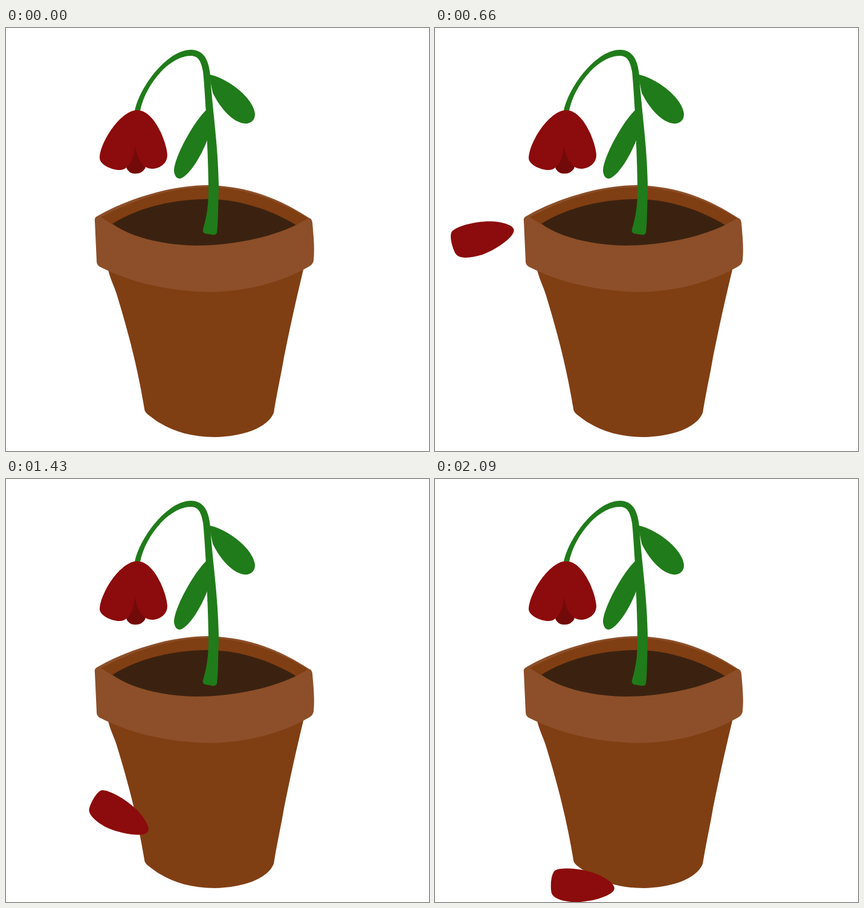
These frames come from a looping animation (700 px wide and 700 px high, 2200 ms). An HTML page:

```html
<!DOCTYPE html>
<html>
<head>
<meta charset="utf-8">
<style>
  html, body { margin: 0; width: 100%; height: 100%; overflow: hidden; background: #fff; }
  svg { display: block; width: 100%; height: 100%; }
</style>
</head>
<body>
<svg viewBox="0 0 700 700">
  <!-- pot -->
  <path fill="#803e13" d="M168 396C172 415 179 427 183 440C206 515 219 570 229 630Q229 636 238 642C265 664 300 677 345 677C390 676 432 663 443 637C449 600 456 570 460 545C470 495 480 450 493 396Z"/>
  <path fill="#8c4f29" d="M150 312C190 288 265 260 335 260C403 262 455 284 501 314Q506 315 507 322C509 345 511 365 509 385Q508 391 501 395C455 421 400 436 335 437C270 435 210 423 155 395Q150 392 150 386L147 320Q146 314 150 312Z"/>
  <path fill="#803e13" d="M157 313C205 287 270 263 335 263C400 265 455 288 500 315L480 326L176 325Z"/>
  <path fill="#3b2210" d="M176 324C215 299 275 283 335 283C390 284 440 302 480 326C435 348 370 360 315 360C260 359 208 347 176 324Z"/>
  <!-- plant -->
  <g fill="#207b1a">
    <path d="M213 137C222 95 268 36 306 36C330 36 336 58 338 78C341 130 352 200 352 265C351 300 351 325 349 339Q347 343 341 342L329 340Q325 338 326 333C333 310 335 290 335 270C335 220 332 180 331 140C329 110 328 90 326 72C323 55 318 46 306 46C270 46 230 95 222 137Z"/>
    <path d="M336 77C365 82 410 115 412 143C412 154 403 159 394 158C372 155 352 128 342 107Z"/>
    <path d="M333 134C310 155 278 215 278 236C279 246 283 250 289 249C305 243 325 208 334 183Z"/>
  </g>
  <path fill="#8c0b0c" d="M217 136C190 136 156 188 155 215C155 226 175 235 187 235Q196 235 200 230L231 230Q236 233 243 233C254 232 267 225 267 210C266 190 246 136 217 136Z"/>
  <path fill="#730a0a" d="M213 193C213 212 207 225 199 231Q203 241 214 241Q226 241 231 231C222 223 215 210 213 193Z"/>
  <path id="petal" fill="#8c0b0c" d="M-47-22C-38-28-8-29 18-22C36-17 53-7 53 1C53 12 20 25-8 28C-28 29-46 25-50 16C-53 8-54-16-47-22Z"/>
</svg>
<script>
const petal = document.getElementById('petal');
const STEP = 110, COUNT = 20;

// step, x, y, angle
const keys = [
  [0, 190, 186, -62],
  [4, 104, 290, -34],
  [5, 61, 318, -24],
  [6, 79, 346, -15],
  [8, 207, 413, 0],
  [11, 267, 519, 18],
  [15, 111, 589, 35],
  [19, 244, 673, 4]
];

// Slope at a key: flat where the value turns back or the path ends
function slope(i, c) {
  const a = keys[i - 1], b = keys[i], d = keys[i + 1];
  if (!a) return (d[c] - b[c]) / (d[0] - b[0]);
  if (!d || (b[c] - a[c]) * (d[c] - b[c]) <= 0) return 0;
  return (d[c] - a[c]) / (d[0] - a[0]);
}

function value(k, c) {
  let i = 0;
  while (i < keys.length - 2 && k > keys[i + 1][0]) i++;
  const a = keys[i], b = keys[i + 1], h = b[0] - a[0];
  const u = (k - a[0]) / h, v = 1 - u;
  return a[c] * v * v * (1 + 2 * u) + b[c] * u * u * (3 - 2 * u)
    + h * u * v * (slope(i, c) * v - slope(i + 1, c) * u);
}

function draw() {
  const k = Math.floor(performance.now() / STEP) % COUNT;
  petal.style.display = k ? '' : 'none';
  petal.setAttribute('transform', `translate(${value(k, 1)} ${value(k, 2)}) rotate(${value(k, 3)})`);
  requestAnimationFrame(draw);
}
draw();
</script>
</body>
</html>
```
